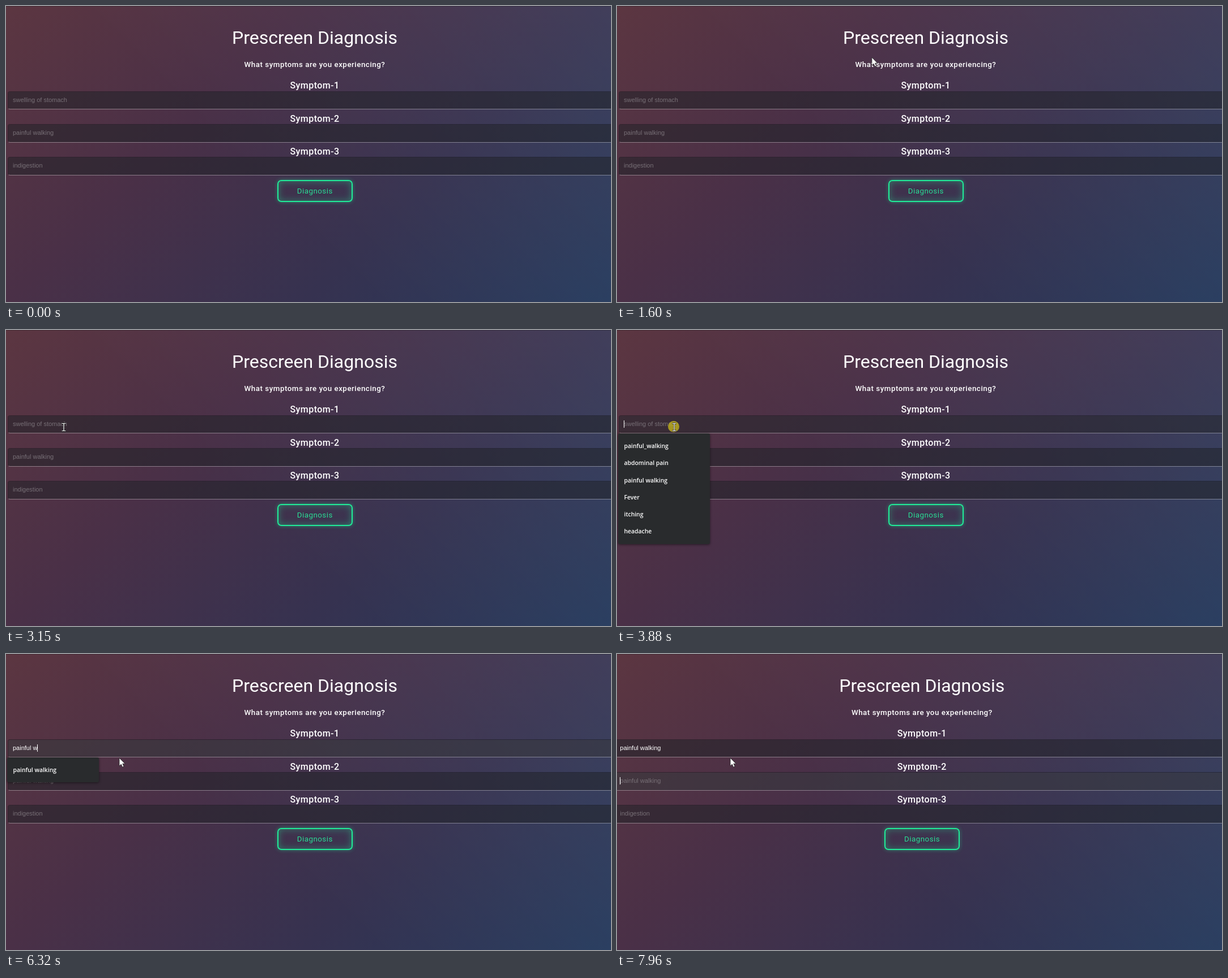
An HTML page that plays this animation: 1068x524 px, repeating every 8 s.

```html
<!DOCTYPE html>
<html lang="en">
<head>
<meta charset="utf-8">
<title>Prescreen Diagnosis</title>
<style>
html, body { margin: 0; width: 100%; height: 100%; overflow: hidden; }
body {
  position: relative;
  color: #fff;
  font-family: Roboto, sans-serif;
  background:
    linear-gradient(45deg, rgba(255,255,255,0) 40%, rgba(255,255,255,.06)),
    linear-gradient(135deg, #5c3641, #4a3047 33%, #363250 66%, #253a5d);
}
body::before {
  content: "";
  position: absolute;
  inset: 0 0 auto;
  height: 1px;
  background: rgba(0,0,0,.25);
}
#page { position: absolute; left: 0; top: 0; width: 1090px; height: 524px; }
h1, h2, label {
  position: absolute;
  left: 0;
  width: 100%;
  margin: 0;
  text-align: center;
  white-space: nowrap;
}
h1 { top: 36px; font: 400 32px/41px Roboto, sans-serif; }
h2 { top: 94px; font: 500 13.33px/20px Roboto, sans-serif; letter-spacing: .53px; }
label { top: -19.4px; font: 500 16px/20px Roboto, sans-serif; letter-spacing: .48px; }
.field { position: absolute; left: 0; width: 100%; height: 33px; }
.box {
  position: absolute;
  left: 2.7px;
  right: 2.7px;
  top: 0;
  height: 32.5px;
  box-sizing: border-box;
  border: 1px solid rgba(20,20,26,.5);
  border-bottom-color: rgba(255,255,255,.36);
  border-radius: 4px;
  background: rgba(34,35,41,.55);
  background-clip: padding-box;
}
.lit {
  position: absolute;
  inset: 0;
  border-radius: 3px;
  background: rgba(255,255,255,.055);
  opacity: 0;
}
.hint, .typed {
  position: absolute;
  left: 12px;
  top: 0;
  font: 11px/31px "Liberation Sans", Arial, sans-serif;
  white-space: pre;
}
.hint { color: #776f76; }
.caret {
  display: inline-block;
  width: 1px;
  height: 13px;
  margin-right: -1px;
  vertical-align: -3px;
  background: #fff;
}
#button {
  position: absolute;
  left: 478.5px;
  top: 307.5px;
  width: 133.5px;
  height: 39px;
  box-sizing: border-box;
  border: 2px solid #20ec98;
  border-radius: 7px;
  box-shadow: 0 0 7px rgba(32,236,152,.4), inset 0 0 13px rgba(32,236,152,.38);
  color: #29de95;
  font-size: 13.33px;
  line-height: 35px;
  letter-spacing: .5px;
  text-align: center;
}
#list {
  position: absolute;
  left: 2px;
  top: 183px;
  width: 162px;
  padding: 7px 0;
  border-radius: 3px;
  background: #292b2d;
  box-shadow: 0 1px 4px rgba(0,0,0,.5);
  font: 600 10.4px/30.3px "Open Sans", "Noto Sans", sans-serif;
}
#list div { padding-left: 10.5px; white-space: pre; }
#cursor { position: absolute; left: 0; top: 0; width: 1px; height: 1px; overflow: visible; }
</style>
</head>
<body>
<div id="page">
  <h1>Prescreen Diagnosis</h1>
  <h2>What symptoms are you experiencing?</h2>
  <div id="button">Diagnosis</div>
</div>
<div id="list"></div>
<svg id="cursor">
  <circle id="ring" r="10" fill="#b9a91e" fill-opacity=".85"/>
  <path id="arrow" d="M0 0V14.2L3.3 11.2L5.5 16.2L8 15.1L5.8 10.2H10Z"
    fill="#fff" stroke="#222" stroke-width=".8" stroke-linejoin="round"/>
  <g id="beam" fill="none">
    <path d="M-3.5-6.5H3.5M0-6.5V6.5M-3.5 6.5H3.5" stroke="#222" stroke-width="2.4"/>
    <path d="M-3.3-6.5H3.3M0-6.5V6.5M-3.3 6.5H3.3" stroke="#fff" stroke-width="1.2"/>
  </g>
</svg>
<script>
const LOOP = 8000, CLICK = 3810, TAB = 7580;
const hints = ["swelling of stomach", "painful walking", "indigestion"];
const history = ["painful_walking", "abdominal pain", "painful walking", "Fever", "itching", "headache"];
const entry = "painful walking";
const keyTimes = [4790, 4920, 5120, 5190, 5390, 5530, 5790, 5920,
  6320, 6520, 6620, 6720, 6920, 7050, 7120];

// Pointer path: time, x, y
const path = [
  [590, 951, 376], [950, 770, 235], [1340, 510, 91], [1600, 450, 91],
  [1740, 432, 88], [1860, 462, 84], [2170, 633, 83], [2300, 590, 88],
  [2600, 250, 140], [2800, 97, 171], [2950, 101, 172], [3150, 102, 172],
  [3810, 101, 172], [3950, 101, 172], [4320, 200, 184]
];

const $ = id => document.getElementById(id);
const clamp = v => Math.min(1, Math.max(0, v));
const smooth = v => v * v * (3 - 2 * v);
const show = (el, on) => { el.style.display = on ? "" : "none"; };

const fields = hints.map((hint, i) => {
  const el = document.createElement("div");
  el.className = "field";
  el.style.top = 150.6 + i * 58.4 + "px";
  el.innerHTML = `<label>Symptom-${i + 1}</label><div class="box"><div class="lit"></div></div>` +
    `<div class="hint">${hint}</div><div class="typed"><span></span><i class="caret"></i></div>`;
  $("page").append(el);
  const part = name => el.querySelector(name);
  return { lit: part(".lit"), hint: part(".hint"), text: part("span"), caret: part(".caret") };
});

function pointerAt(t) {
  const next = path.findIndex(p => p[0] > t);
  if (next < 0) return path[path.length - 1].slice(1);
  const a = path[Math.max(0, next - 1)], b = path[next];
  const k = clamp((t - a[0]) / (b[0] - a[0] || 1));
  return [1, 2].map(i => a[i] + (b[i] - a[i]) * k);
}

function drawPointer(t) {
  const [x, y] = pointerAt(t);
  const inField = t > 2230 && y > 151 && y < 183;
  show($("cursor"), t >= 590);
  $("cursor").style.transform = `translate(${x}px, ${y}px)`;
  show($("arrow"), !inField);
  show($("beam"), inField);
  show($("ring"), t >= CLICK && t < 3990);
  $("ring").setAttribute("cx", -1);
  $("ring").setAttribute("cy", -1);
}

let shownRows;
function drawList(t, value) {
  const open = t >= CLICK && t < TAB && value !== entry;
  const rows = open ? history.filter(s => s.startsWith(value)) : [];
  const html = rows.map(s => `<div>${s}</div>`).join("");
  show($("list"), open);
  if (html !== shownRows) $("list").innerHTML = shownRows = html;
}

function draw(now) {
  const t = now % LOOP;
  const value = entry.slice(0, keyTimes.filter(k => k <= t).length);
  const focus = t < CLICK ? -1 : t < TAB ? 0 : 1;
  const glow = [
    smooth(clamp((t - CLICK) / 300)) * (1 - smooth(clamp((t - TAB) / 300))),
    smooth(clamp((t - TAB) / 300)),
    0
  ];
  fields.forEach((f, i) => {
    const text = i ? "" : value;
    if (f.text.textContent !== text) f.text.textContent = text;
    show(f.hint, !text);
    show(f.caret, i === focus);
    f.lit.style.opacity = glow[i];
  });
  $("page").style.left = -6.7 * smooth(clamp((t - TAB) / 380)) + "px";
  drawList(t, value);
  drawPointer(t);
}

const start = performance.now();
function tick() {
  draw(performance.now() - start);
  requestAnimationFrame(tick);
}
tick();
</script>
</body>
</html>
```
